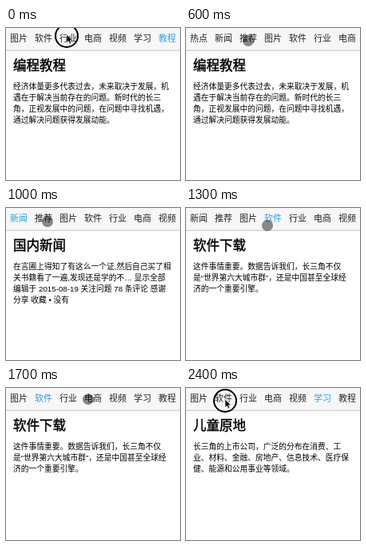
Animation, 218 px wide and 191 px high, one loop 2.5 s. Source, as an HTML page:

```html
<!DOCTYPE html>
<html lang="zh-CN">
<head>
<meta charset="utf-8">
<style>
html, body { margin: 0; width: 218px; height: 191px; overflow: hidden; background: #fff; }
svg { display: block; }
text { font-family: "Liberation Sans", "Noto Sans CJK SC", "Noto Sans CJK", sans-serif; fill: #000; }
#nav text { font-size: 11px; fill: #222; }
#nav text.on { fill: #2a9ee8; }
#title { font-size: 16.5px; stroke: #000; stroke-width: .45px; }
#body text { font-size: 9.75px; }
</style>
</head>
<body>
<svg width="218" height="191" viewBox="0 0 218 191">
  <rect width="218" height="28" fill="#f7f7f7"/>
  <rect y="27.7" width="218" height="1" fill="#c4c4c4"/>
  <g id="nav"></g>
  <text id="title" x="9" y="53"></text>
  <g id="body"></g>
  <circle id="touch" r="7" fill="#000" fill-opacity=".45"/>
  <g id="mouse">
    <circle r="14" fill="none" stroke="#000" stroke-width="2"/>
    <path d="M0-2V8.5L2.4 6.4L4 10L5.8 9.2L4.2 5.7H7.4Z" fill="#000" stroke="#fff" stroke-width=".7"/>
  </g>
</svg>
<script>
const $ = id => document.getElementById(id);
const tabs = ['热点', '新闻', '推荐', '图片', '软件', '行业', '电商', '视频', '学习', '教程'];
const pitch = 31, maxScroll = 93;

const pages = {
  教程: ['编程教程', '经济体量更多代表过去，未来取决于发展，机', '遇在于解决当前存在的问题。新时代的长三', '角，正视发展中的问题，在问题中寻找机遇，', '通过解决问题获得发展动能。'],
  新闻: ['国内新闻', '在言圃上得知了有这么一个证,然后自己买了相', '关书籍看了一遍,发现还是学的不… 显示全部', '编辑于 2015-08-19 关注问题 78 条评论 感谢', '分享 收藏 • 没有'],
  软件: ['软件下载', '这件事情重要。数据告诉我们，长三角不仅', '是“世界第六大城市群”，还是中国甚至全球经', '济的一个重要引擎。'],
  电商: ['电商行情', '截止2018年5月28日，总部位于长三角34个城', '市的上市公司，总市值已经超过21万亿元人民', '币。2017财年总营收超过10万亿人民币。'],
  学习: ['儿童原地', '长三角的上市公司，广泛的分布在消费、工', '业、材料、金融、房地产、信息技术、医疗保', '健、能源和公用事业等领域。']
};

// The pointer leaves and arrives at these steps of 100 ms; a tab is tapped on arrival
const moves = [
  { leave: 0, arrive: 3, x: 44, y: 23, swipe: true },
  { leave: 3, arrive: 5, x: 78, y: 16 },
  { leave: 6, arrive: 8, x: 52, y: 17, tab: '新闻' },
  { leave: 10, arrive: 13, x: 102, y: 22, tab: '软件' },
  { leave: 14, arrive: 18, x: 103, y: 14, tab: '电商' },
  { leave: 18, arrive: 22, x: 175, y: 15, tab: '学习' },
  { leave: 22, arrive: 24, x: 49, y: 16 }
];

const clamp = p => Math.max(0, Math.min(1, p));
const mix = (a, b, p) => a + (b - a) * p;
const settle = p => 1 - (1 - clamp(p)) ** 3;
const glide = p => Math.sin(clamp(p) * Math.PI / 2);

function stateAt(step) {
  const s = { x: 76, y: 10, scroll: maxScroll, tab: '教程' };
  for (const m of moves) {
    const p = settle((step - m.leave) / (m.arrive - m.leave));
    s.x = mix(s.x, m.x, p);
    s.y = mix(s.y, m.y, p);
    if (step < m.arrive || !(m.tab || m.swipe)) continue;
    const target = m.swipe ? 0 : Math.min(pitch * tabs.indexOf(m.tab), maxScroll);
    s.scroll = mix(s.scroll, target, glide((step - m.arrive) / 2));
    s.tab = m.tab || s.tab;
  }
  return s;
}

function addText(parent, x, y, str) {
  const el = document.createElementNS('http://www.w3.org/2000/svg', 'text');
  el.setAttribute('x', x);
  el.setAttribute('y', y);
  el.textContent = str;
  parent.append(el);
  return el;
}

const place = (el, x, y) => el.setAttribute('transform', `translate(${x} ${y})`);
const labels = tabs.map((name, i) => addText($('nav'), 5 + pitch * i, 17.2, name));

let shown;
function open(name) {
  if (name === shown) return;
  shown = name;
  const [title, ...lines] = pages[name];
  $('title').textContent = title;
  $('body').replaceChildren();
  lines.forEach((line, i) => addText($('body'), 9, 76.5 + 14 * i, line));
  labels.forEach((el, i) => el.classList.toggle('on', tabs[i] === name));
}

function draw() {
  const step = Math.floor(performance.now() % 2500 / 100);
  const { x, y, scroll, tab } = stateAt(step);
  const isMouse = step === 0 || step === 24;
  open(tab);
  place($('nav'), -scroll, 0);
  place($('touch'), x, y);
  place($('mouse'), x, y);
  $('touch').style.display = isMouse ? 'none' : '';
  $('mouse').style.display = isMouse ? '' : 'none';
  requestAnimationFrame(draw);
}
draw();
</script>
</body>
</html>
```
